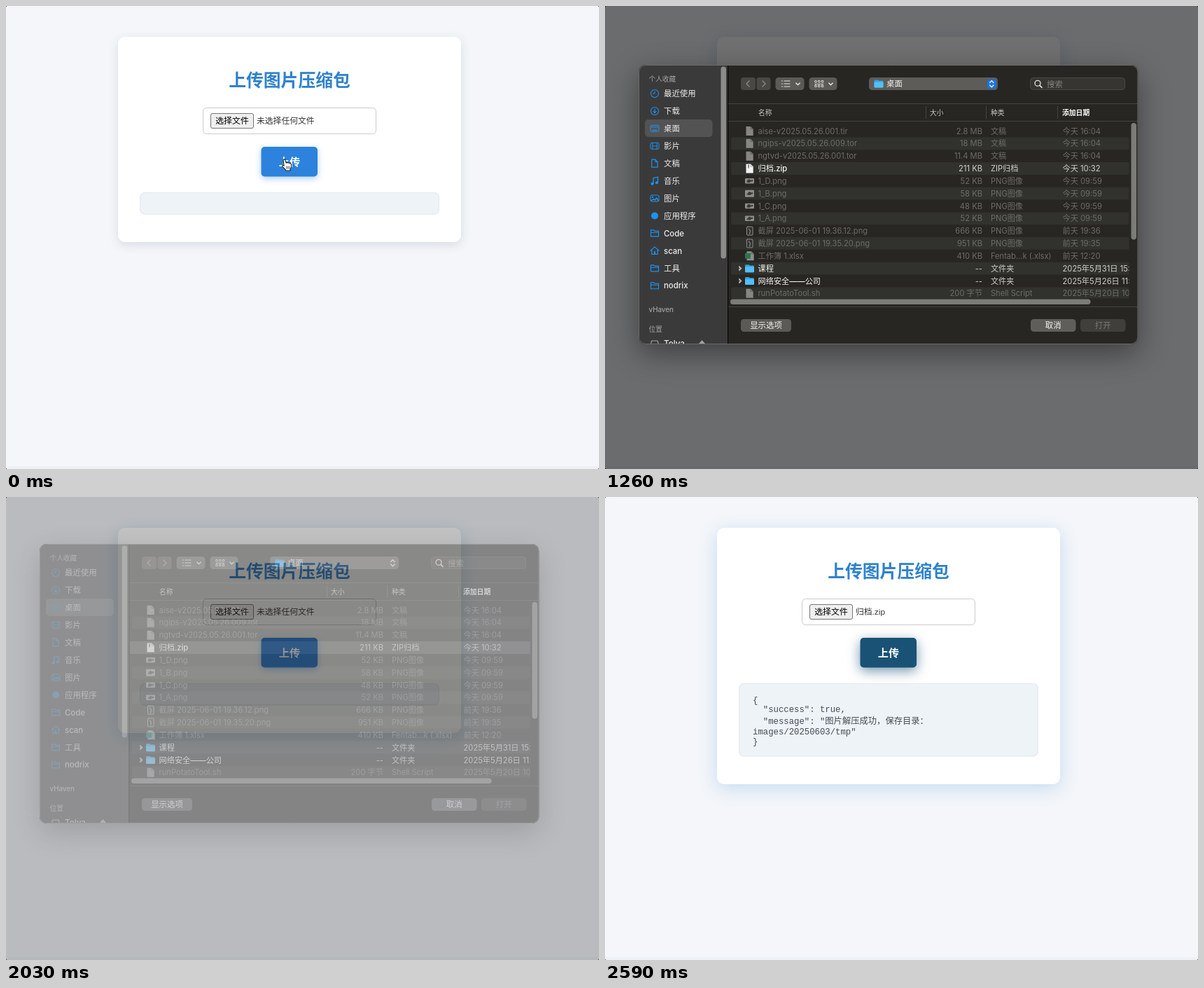
These frames come from a looping animation (847x661 px, 3.71 s). An HTML page with a canvas:

```html
<!DOCTYPE html>
<html lang="zh">
<head>
<meta charset="utf-8">
<title>上传图片压缩包</title>
<style>
html, body { margin: 0; width: 100%; height: 100%; overflow: hidden; background: #f4f6f9; }
canvas { display: block; width: 847px; height: 661px; }
</style>
</head>
<body>
<canvas id="stage" width="847" height="661"></canvas>
<script>
const W = 847, H = 661, LOOP = 3710, STEP = 70;
const SANS = 'Inter, "Noto Sans CJK SC", "Noto Sans CJK", sans-serif';
const CJK = '"Noto Sans CJK SC", "Noto Sans CJK", sans-serif';
const MONO = '"Liberation Mono", "Noto Sans CJK SC", "Noto Sans CJK", monospace';
const page = document.getElementById('stage').getContext('2d');
const sheet = document.createElement('canvas');
sheet.width = W;
sheet.height = H;
const panel = sheet.getContext('2d');
const BOX = { x: 48, y: 84, w: 713.5, h: 399 };
let c = page;

const clamp = v => Math.max(0, Math.min(1, v));
const ramp = (t, a, b) => clamp((t - a) / (b - a));
const mix = (a, b, k) => a + (b - a) * k;
const blend = (a, b, k) => `rgb(${a.map((v, i) => Math.round(mix(v, b[i], k)))})`;

// Piecewise linear value through [time, value] points
function track(t, points) {
  for (let i = 1; i < points.length; i++) {
    const [t0, v0] = points[i - 1], [t1, v1] = points[i];
    if (t <= t1) return mix(v0, v1, ramp(t, t0, t1));
  }
  return points[points.length - 1][1];
}

function trace(x, y, w, h, r) {
  c.beginPath();
  c.roundRect(x, y, w, h, r);
}

function box(x, y, w, h, r, fill, stroke) {
  if (fill) {
    trace(x, y, w, h, r);
    c.fillStyle = fill;
    c.fill();
  }
  if (stroke) {
    trace(x + .5, y + .5, w - 1, h - 1, r);
    c.strokeStyle = stroke;
    c.lineWidth = 1;
    c.stroke();
  }
}

function shade(color, blur, dy, draw) {
  c.save();
  c.shadowColor = color;
  c.shadowBlur = blur;
  c.shadowOffsetY = dy;
  draw();
  c.restore();
}

function text(s, x, y, size, color, opt = {}) {
  c.font = `${opt.weight || 400} ${size}px ${opt.font || SANS}`;
  c.textAlign = opt.align || 'left';
  c.fillStyle = color;
  c.fillText(s, x, y + size * .37);
}

function line(points, color, width = 1.2) {
  c.beginPath();
  points.forEach(([x, y], i) => i ? c.lineTo(x, y) : c.moveTo(x, y));
  c.strokeStyle = color;
  c.lineWidth = width;
  c.lineCap = c.lineJoin = 'round';
  c.stroke();
}

function ring(x, y, r, color, width = 1.1) {
  c.beginPath();
  c.arc(x, y, r, 0, Math.PI * 2);
  c.strokeStyle = color;
  c.lineWidth = width;
  c.stroke();
}

function dot(x, y, r, color) {
  c.beginPath();
  c.arc(x, y, r, 0, Math.PI * 2);
  c.fillStyle = color;
  c.fill();
}

function chevron(x, y, dx, dy, color, width = 1.3) {
  line([[x - dx - dy, y - dy - dx], [x + dx, y + dy], [x - dx + dy, y - dy + dx]], color, width);
}

// ---------- web page ----------
function hand(x, y) {
  c.save();
  c.translate(x, y);
  c.beginPath();
  c.moveTo(3, 9);
  c.lineTo(2, 2);
  c.quadraticCurveTo(3, 0, 4.8, 1.6);
  c.lineTo(6.2, 6);
  c.quadraticCurveTo(7.5, 4.7, 8.7, 6);
  c.quadraticCurveTo(10.2, 5, 11.2, 6.7);
  c.quadraticCurveTo(13.2, 6.2, 13.5, 8.5);
  c.quadraticCurveTo(14, 12, 12, 14.5);
  c.lineTo(12, 17);
  c.lineTo(6, 17);
  c.quadraticCurveTo(4, 14, .8, 11.2);
  c.quadraticCurveTo(.5, 8.5, 3, 10);
  c.closePath();
  c.fillStyle = '#fff';
  c.strokeStyle = '#222';
  c.lineWidth = 1.1;
  c.fill();
  c.stroke();
  for (const dx of [6.6, 8.6, 10.6]) line([[dx, 11], [dx, 14.2]], '#333', .8);
  c.restore();
}

function drawPage(t) {
  c = page;
  c.fillStyle = '#333';
  c.fillRect(0, 0, W, H);
  box(0, 0, W, H, 2, '#f4f6f9');
  c.fillStyle = '#eef2f6';
  c.fillRect(2, 657, W - 4, 4);

  const done = t >= 2520;
  const grow = done ? 73 : 0;
  const glow = ramp(t, 0, 350);
  const card = () => box(160, 44, 490, 293 + grow, 10, '#fff');
  shade(`rgba(70,100,130,${.17 * (1 - glow)})`, 14, 4, card);
  shade(`rgba(44,130,220,${.23 * glow})`, 26, 6, card);

  text('上传图片压缩包', 405, 106, 24.8, '#2f82cc', { weight: 700, align: 'center', font: CJK });

  const over = t >= 490 && t < 980;
  const pressed = t >= 630 && t < 980;
  box(281, 145, 248, 38, 5, '#fff', over ? '#5b87a6' : '#cbcccf');
  box(292, 153, 62, 22, 2.5, pressed ? '#dedfe0' : '#efefef', '#767676');
  text('选择文件', 323, 164, 11.9, '#000', { align: 'center', font: CJK, weight: 500 });
  text(t < 2240 ? '未选择任何文件' : '归档.zip', 358, 164, 11.8, '#333',
    { font: '"Liberation Sans", ' + CJK });

  const hover = track(t, [[0, 0], [140, .35], [350, 0], [2240, 0], [2520, 1]]);
  const tint = blend([44, 130, 220], [26, 82, 118], hover);
  shade(tint.replace('rgb', 'rgba').replace(')', `,${mix(.38, .6, hover)})`),
    mix(10, 17, hover), mix(3, 5, hover), () => box(364.5, 201, 80.5, 42.5, 5, tint));
  text('上传', 405, 222, 15.2, '#fff', { weight: 700, align: 'center', font: CJK });

  box(191, 266, 428, 31.5 + grow, 7, '#eef3f8', '#e3e8ed');
  if (done) {
    const rows = ['{', '  "success": true,', '  "message": "图片解压成功，保存目录：',
      'images/20250603/tmp"', '}'];
    const ys = [289, 302.5, 319, 334, 348];
    rows.forEach((s, i) => text(s, 211, ys[i], 12.3, '#454b52', { font: MONO }));
  }

  if (t < 630) {
    const k = ramp(t, 0, 490), e = k * k * (3 - 2 * k);
    hand(mix(394, 317, e), mix(218, 160, e) - 12 * Math.sin(Math.PI * e));
  }
}

// ---------- file dialog ----------
const places = ['最近使用', '下载', '桌面', '影片', '文稿', '音乐', '图片', '应用程序',
  'Code', 'scan', '工具', 'nodrix'];

const glyphs = [
  (x, y, k) => { ring(x, y, 5.5, k); line([[x, y - 3], [x, y], [x - 2.5, y]], k, 1); },
  (x, y, k) => {
    ring(x, y, 5.5, k);
    line([[x, y - 3], [x, y + 2.5]], k, 1.1);
    line([[x - 2, y + .5], [x, y + 2.7], [x + 2, y + .5]], k, 1.1);
  },
  (x, y, k) => {
    box(x - 6.5, y - 5, 13, 10, 2, null, k);
    line([[x - 5, y - 2], [x + 5, y - 2]], k, 1);
    line([[x - 3, y + 2.5], [x + 3, y + 2.5]], k, 1.4);
  },
  (x, y, k) => {
    box(x - 6.5, y - 5, 13, 10, 1.5, null, k);
    for (const d of [-3.2, 3.2]) line([[x + d, y - 4], [x + d, y + 4]], k, 1);
    line([[x - 3, y], [x + 3, y]], k, 1);
  },
  (x, y, k) => {
    line([[x - 4.2, y - 5.5], [x + .8, y - 5.5], [x + 4.2, y - 2], [x + 4.2, y + 5.5],
      [x - 4.2, y + 5.5], [x - 4.2, y - 5.5]], k);
    line([[x + .8, y - 5], [x + .8, y - 2], [x + 4, y - 2]], k, 1);
  },
  (x, y, k) => {
    line([[x - 2, y + 4], [x - 2, y - 4], [x + 4.5, y - 5.5], [x + 4.5, y + 2.5]], k, 1.4);
    dot(x - 3.6, y + 4, 2, k);
    dot(x + 2.9, y + 2.6, 2, k);
  },
  (x, y, k) => {
    box(x - 6.5, y - 5, 13, 10, 2, null, k);
    dot(x - 3, y - 1.7, 1.2, k);
    line([[x - 5, y + 3.4], [x - 1.5, y + 1], [x + .5, y + 2.5], [x + 2.8, y - .5], [x + 5, y + 3.4]], k, 1.5);
  },
  (x, y, k) => dot(x, y, 5, k)
];

function folderLine(x, y, k) {
  line([[x - 5.5, y + 4.5], [x - 5.5, y - 4.5], [x - 1.5, y - 4.5], [x, y - 3], [x + 5.5, y - 3],
    [x + 5.5, y + 4.5], [x - 5.5, y + 4.5]], k);
  line([[x - 5, y - 1], [x + 5, y - 1]], k, 1);
}

function house(x, y, k) {
  line([[x - 6, y], [x, y - 5.5], [x + 6, y]], k);
  line([[x - 4.2, y - 1], [x - 4.2, y + 5], [x + 4.2, y + 5], [x + 4.2, y - 1]], k);
  line([[x, y + 4.5], [x, y + 1.5]], k, 2);
}

function folder(x, y) {
  box(x - 6.5, y - 5.5, 6.5, 4, 1.2, '#2d9bd8');
  box(x - 6.5, y - 4.2, 13, 9.8, 1.5, '#35abea');
  box(x - 6.5, y - 2.2, 13, 7.8, 1.5, '#55bef5');
}

const png = (name, size, date) => [name, size, 'PNG图像', date, 'image'];
const files = [
  ['aise-v2025.05.26.001.tir', '2.8 MB', '文稿', '今天 16:04', 'doc'],
  ['ngips-v2025.05.26.009.tor', '18 MB', '文稿', '今天 16:04', 'doc'],
  ['ngtvd-v2025.05.26.001.tor', '11.4 MB', '文稿', '今天 16:04', 'doc'],
  ['归档.zip', '211 KB', 'ZIP归档', '今天 10:32', 'zip'],
  png('1_D.png', '52 KB', '今天 09:59'),
  png('1_B.png', '58 KB', '今天 09:59'),
  png('1_C.png', '48 KB', '今天 09:59'),
  png('1_A.png', '52 KB', '今天 09:59'),
  ['截屏 2025-06-01 19.36.12.png', '666 KB', 'PNG图像', '前天 19:36', 'shot'],
  ['截屏 2025-06-01 19.35.20.png', '951 KB', 'PNG图像', '前天 19:35', 'shot'],
  ['工作簿 1.xlsx', '410 KB', 'Fentab...k (.xlsx)', '前天 12:20', 'sheet'],
  ['课程', '--', '文件夹', '2025年5月31日 15:20', 'folder'],
  ['网络安全——公司', '--', '文件夹', '2025年5月26日 11:08', 'folder'],
  ['runPotatoTool.sh', '200 字节', 'Shell Script', '2025年5月20日 10:41', 'doc']
];

function page3(x, y, fill, fold) {
  c.beginPath();
  c.moveTo(x - 5, y - 6.5);
  c.lineTo(x + 1.5, y - 6.5);
  c.lineTo(x + 5.2, y - 2.8);
  c.lineTo(x + 5.2, y + 6.5);
  c.lineTo(x - 5, y + 6.5);
  c.closePath();
  c.fillStyle = fill;
  c.fill();
  line([[x + 1.5, y - 6], [x + 1.5, y - 2.8], [x + 5, y - 2.8]], fold, .8);
}

function fileIcon(kind, y, i) {
  const x = 206.5;
  if (kind === 'folder') {
    folder(x, y);
    chevron(193, y, 1.5, 0, '#b9b9b7', 1.2);
    line([[191.7, y - 3], [194.7, y], [191.7, y + 3]], '#b9b9b7', 1.2);
  } else if (kind === 'image') {
    const tall = i === 5 ? 10 : 7.5;
    box(x - 6.5, y - tall / 2, 13, tall, 1, '#8d8d8b');
    dot(x - 1 + i % 2, y, 2.4, '#353533');
    line([[x - 3, y + 1], [x + 4, y - .5]], '#3a3a38', 2);
  } else if (kind === 'shot') {
    box(x - 4.5, y - 6.5, 9.5, 13, 1, '#30302e', '#8f8f8d');
    line([[x - 1, y - 3], [x + 1, y], [x, y + 4]], '#777775', 1.6);
  } else if (kind === 'sheet') {
    page3(x + 1, y, '#8c908d', '#555');
    box(x - 6.5, y - 4, 8, 8, 1, '#2c7550');
  } else {
    const zip = kind === 'zip';
    page3(x, y, zip ? '#f4f4f4' : '#868684', zip ? '#999' : '#555');
    if (zip) line([[x - 1.5, y - 5], [x - 1.5, y - 1]], '#555', 1.3);
  }
}

function drawSidebar(active) {
  c.fillStyle = active ? '#3b3a3a' : '#444443';
  c.fillRect(48, 84, 128, 399);
  const blue = active ? '#1a93f3' : '#2b73a6';
  const ink = active ? '#eeeeed' : '#b9b9b8';
  const head = '#a3a3a2';
  text('个人收藏', 62.5, 104, 9.7, head, { weight: 500 });
  box(57, 162, 96.5, 25, 5, active ? '#545353' : '#5c5c5b');
  places.forEach((name, i) => {
    const y = 125 + i * 24.93;
    const draw = glyphs[i] || (i === 9 ? house : folderLine);
    draw(71, y, blue);
    text(name, 84, y, 11.4, ink, { weight: 500 });
  });
  text('vHaven', 62.5, 433, 9.8, head, { weight: 500 });
  text('位置', 62.5, 461, 9.7, head, { weight: 500 });
  line([[65.5, 483], [66.5, 478], [75, 478], [76.5, 483]], '#a0a0a0');
  text('Tolva', 84, 481.5, 11.6, ink, { weight: 500 });
  c.beginPath();
  c.moveTo(134, 482);
  c.lineTo(138.5, 477);
  c.lineTo(143, 482);
  c.fillStyle = '#a0a0a0';
  c.fill();
  box(165.5, 86.5, 7.5, 274, 4, '#8b8b8a');
  c.fillStyle = '#0b0b0a';
  c.fillRect(175, 84, 1.3, 399);
}

function drawToolbar(popup) {
  const key = '#5b5a57', ink = '#e6e6e4';
  box(194, 102, 21, 18, 4, '#494845');
  box(216.5, 102, 20, 18, 4, '#494845');
  line([[206, 107], [202, 111], [206, 115]], '#8a8a88', 1.3);
  line([[225, 107], [229, 111], [225, 115]], '#8a8a88', 1.3);
  box(243.5, 102, 41, 18, 4.5, key);
  box(291.5, 102, 40, 18, 4.5, key);
  for (const d of [-4, 0, 4]) {
    dot(253, 111 + d, .8, ink);
    line([[256, 111 + d], [264, 111 + d]], ink, 1.1);
    for (const y of [108, 114.5]) box(304 + d * 1.2, y - 2, 3.6, 3.6, .7, null, ink);
  }
  line([[300, 111.3], [312, 111.3]], ink, .8);
  for (const x of [275.5, 322.5]) line([[x - 2.7, 110], [x, 112.7], [x + 2.7, 110]], ink, 1.4);
  box(377, 102, 184, 18, 4.5, '#5d5c59');
  folder(391, 111);
  text('桌面', 402, 111, 11.4, '#f2f2f0', { weight: 500 });
  if (popup) box(546, 105, 13, 13, 3.5, '#1673e6');
  line([[549.5, 109.5], [552.3, 106.8], [555, 109.5]], '#f4f4f4', 1.4);
  line([[549.5, 113], [552.3, 115.7], [555, 113]], '#f4f4f4', 1.4);
  box(607, 102, 136, 18, 4.5, '#363531', '#484743');
  ring(618, 110.3, 4, ink, 1.3);
  line([[621, 113.4], [624, 116.4]], ink, 1.5);
  text('搜索', 631, 111.3, 11.4, '#858582');
}

function drawTable(picked) {
  c.fillStyle = '#454440';
  c.fillRect(176, 139, 586, 1);
  c.fillRect(176, 164, 586, 1);
  for (const x of [458, 544, 646]) c.fillRect(x, 143, 1, 18);
  [['名称', 219], ['大小', 464], ['种类', 551]].forEach(([s, x]) => text(s, x, 152, 9.7, '#c9c9c7', { weight: 500 }));
  text('添加日期', 653, 152, 9.8, '#fff', { weight: 700 });

  c.save();
  c.beginPath();
  c.rect(176, 165, 572.5, 252.5);
  c.clip();
  files.forEach(([name, size, kind, date, icon], i) => {
    const y = 178.5 + i * 17.83;
    const chosen = i === 3 && picked;
    if (chosen) box(177, y - 8.9, 572, 17.8, 0, picked);
    else if (i % 2) box(180, y - 8.9, 569, 17.8, 2, '#31312d');
    const on = icon === 'zip' || icon === 'folder';
    const ink = on ? '#f6f6f4' : '#6c6c69';
    const soft = on ? '#cececb' : '#6c6c69';
    fileIcon(icon, y, i);
    text(name, 218.5, y, 11.2, ink, { weight: on ? 500 : 400 });
    text(size, 539, y, 11.2, soft, { align: 'right' });
    text(kind, 551, y, 11.1, soft);
    text(date, 653.5, y, 11.2, soft);
  });
  c.restore();
  box(179, 418.5, 514.5, 7.5, 4, '#7b7b78');
  box(751.5, 167, 7.5, 166.5, 4, '#7b7b78');
  c.fillStyle = '#454440';
  c.fillRect(176, 429, 586, 1);
}

function button(s, x, w, fill, ink) {
  box(x, 447, w, 18, 4.5, fill);
  text(s, x + w / 2, 456, 11.4, ink, { align: 'center', weight: 500 });
}

function drawDialog(t) {
  c = panel;
  c.clearRect(0, 0, W, H);
  const active = t >= 1050 && t < 1890;
  const popup = t >= 1050 && t < 1750;
  const fresh = t >= 1680 && t < 1750;
  const picked = t < 1680 ? null : fresh ? '#0a58c9' : '#4b4a48';
  c.save();
  trace(BOX.x, BOX.y, BOX.w, BOX.h, 10);
  c.clip();
  c.fillStyle = '#272622';
  c.fillRect(BOX.x, BOX.y, BOX.w, BOX.h);
  drawSidebar(active);
  drawToolbar(popup);
  drawTable(picked);
  button('显示选项', 194, 72, '#5b5a57', '#f2f2f0');
  button('取消', 608, 64.5, '#5f5e5b', '#f6f6f4');
  button('打开', 679, 64.5, fresh ? '#1673e6' : '#403f3c', fresh ? '#fff' : '#797976');
  c.restore();
  box(BOX.x, BOX.y, BOX.w, BOX.h, 10, null, '#6b6a68');
}

function showDialog(t) {
  const dim = track(t, [[980, .42], [1120, .52], [1260, .56], [1820, .56], [1890, .49], [1960, .38],
    [2030, .24], [2100, .1], [2170, .03], [2240, 0]]);
  const alpha = track(t, [[980, 1], [1820, 1], [1890, .87], [1960, .64], [2030, .36], [2100, .14],
    [2170, .04], [2240, 0]]);
  const top = Math.round(track(t, [[980, 80], [1120, 83], [1260, 84], [1820, 84], [1890, 81],
    [1960, 76], [2030, 67], [2100, 56], [2240, 38]]));
  drawDialog(t);
  c = page;
  c.fillStyle = `rgba(0,0,0,${dim})`;
  c.fillRect(0, 0, W, H);

  // Shadow only outside the window, so it never shows through
  c.save();
  c.globalAlpha = alpha;
  c.beginPath();
  c.rect(0, 0, W, H);
  c.roundRect(BOX.x, top, BOX.w, BOX.h, 10);
  c.clip('evenodd');
  shade('rgba(0,0,0,.42)', 42, 13, () => box(BOX.x, top, BOX.w, BOX.h, 10, '#000'));
  c.restore();

  c.globalAlpha = alpha;
  c.drawImage(sheet, 0, top - BOX.y);
  c.globalAlpha = 1;
}

function frame(now) {
  const t = Math.floor((now % LOOP) / STEP) * STEP;
  drawPage(t);
  if (t >= 980 && t < 2240) showDialog(t);
  requestAnimationFrame(frame);
}
frame(performance.now());
</script>
</body>
</html>
```
